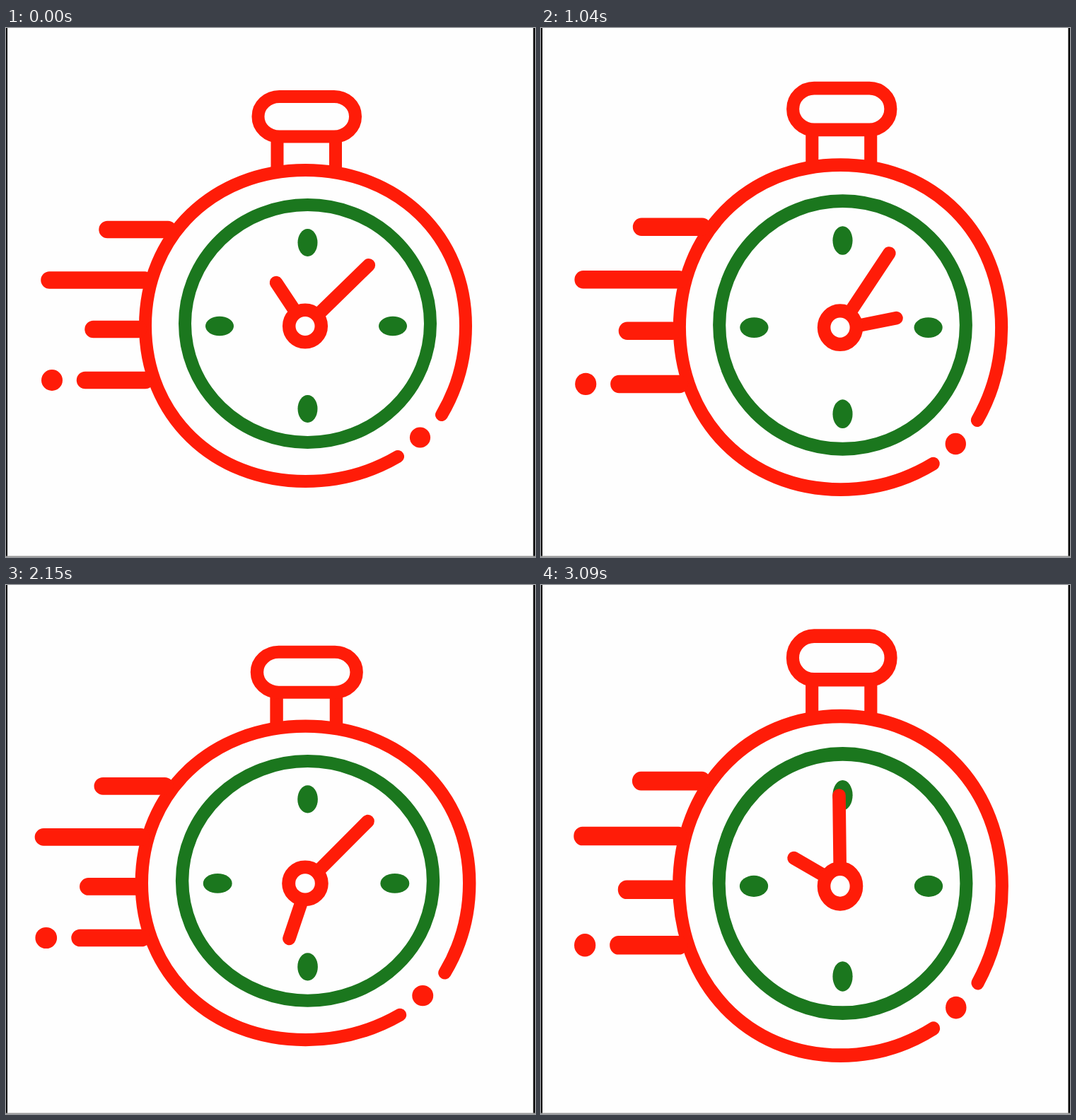
These frames come from a looping animation (748 by 748 pixels, 3120 ms). An HTML page:

```html
<!DOCTYPE html>
<html>
<head>
<meta charset="utf-8">
<title>Stopwatch</title>
<style>
  html, body { margin: 0; width: 100%; height: 100%; overflow: hidden; background: #fefefe; }
  svg { display: block; width: 100vw; height: 100vh; }
  .red { fill: none; stroke: #ff1c08; stroke-width: 18; stroke-linecap: round; }
  .dot { fill: #ff1c08; }
  .green { fill: #1b771e; }
</style>
</head>
<body>
<svg viewBox="0 0 748 748">
  <g class="body">
    <ellipse cx="426.5" cy="418" rx="173.5" ry="168" fill="none" stroke="#1b771e" stroke-width="18"/>
    <g class="green">
      <ellipse cx="426.5" cy="303.5" rx="14" ry="19.5"/>
      <ellipse cx="426.5" cy="538.5" rx="14" ry="19.5"/>
      <ellipse cx="302" cy="421.5" rx="20" ry="13.8"/>
      <ellipse cx="547" cy="421.5" rx="20" ry="13.8"/>
    </g>
    <g class="red">
      <path d="M616 547A226.7 238.5 0 0 0 650 421C650 294.5 553.7 201 423.5 201S197 294.5 197 421S293.3 641 423.5 641A242 220 0 0 0 554 606"/>
      <path d="M383.5 156V199M466 156V199" stroke-linecap="butt"/>
      <rect x="356.5" y="97" width="137.5" height="56.5" rx="30" ry="28"/>
      <path d="M143.5 285H229M61.5 356.5H196M123.5 426H187M112 498H197" stroke-width="24.5"/>
    </g>
    <circle class="dot" cx="65" cy="498" r="15"/>
    <circle class="dot" cx="585.5" cy="579" r="14.6"/>
  </g>
  <g class="red" style="stroke-width:18.6">
    <path id="minute" d="M423 423V297.5"/>
    <path id="hour" d="M425.5 425.5V347"/>
  </g>
  <g class="body">
    <circle class="red" cx="423" cy="421.5" r="22.8" style="fill:#fefefe;stroke-width:18.5"/>
  </g>
  <path d="M0 0H2V748H0ZM745.5 0H748V748H745.5Z" fill="#000"/>
  <path d="M0 747.3H748" stroke="#999" stroke-width="1.4"/>
</svg>
<script>
const LOOP = 3120;
const longHolds = [0, 8, 18, 27, 37];

// start time of every drawing
const starts = [0];
for (let i = 0; i < 42; i++) starts.push(starts[i] + (longHolds.includes(i) ? 100 : 70));

// squash and stretch: time, x scale, y scale
const poses = [
  [0, 1, 1], [830, .990, 1.056], [1320, 1.028, 1.024], [1770, .987, 1.047],
  [2150, 1.023, 1.008], [2640, 1.020, 1.09], [3090, 1.008, 1.09]
];

const bodies = document.querySelectorAll('.body');
const minute = document.getElementById('minute');
const hour = document.getElementById('hour');

function scaleAt(t) {
  const n = Math.max(1, poses.findIndex(p => p[0] >= t));
  const a = poses[n - 1], b = poses[n];
  const u = (t - a[0]) / (b[0] - a[0]);
  const ease = u * u * (3 - 2 * u);
  return [1, 2].map(k => a[k] + (b[k] - a[k]) * ease);
}

function draw(now) {
  const time = now % LOOP;
  const t = starts.filter(s => s <= time).pop();
  const [sx, sy] = scaleAt(t);
  for (const b of bodies)
    b.setAttribute('transform', `translate(423.5 373) scale(${sx} ${sy}) translate(-423.5 -373)`);
  minute.setAttribute('transform', `rotate(${45.7 + .3345 * t} 423 423)`);
  hour.setAttribute('transform', `rotate(${-33.6 + .108 * t} 425.5 425.5)`);
}

const origin = performance.now();
function tick() {
  draw(performance.now() - origin);
  requestAnimationFrame(tick);
}
tick();
</script>
</body>
</html>
```
